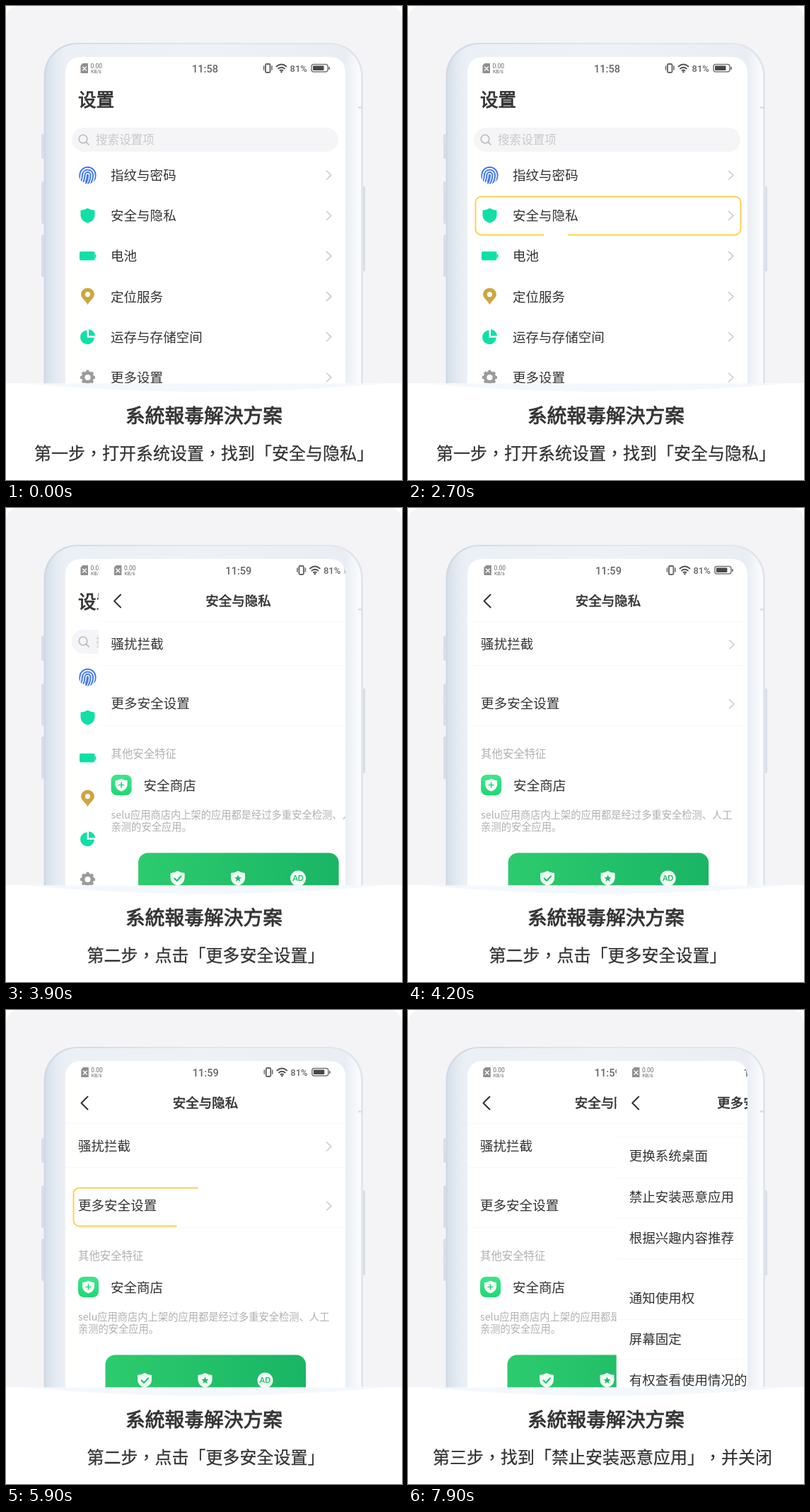
An HTML page that plays this animation: 560x670 px, repeating every 8 s.

```html
<!DOCTYPE html>
<html lang="zh-Hans">
<head>
<meta charset="utf-8">
<style>
html, body { margin: 0; width: 100%; height: 100%; overflow: hidden; background: #fff; }
svg { display: block; width: 560px; height: 670px; }
text { font-family: "Noto Sans CJK SC", "Noto Sans CJK", sans-serif; fill: #333; text-spacing-trim: space-all; white-space: pre; }
.num { font-family: Roboto, sans-serif; fill: #666; }
.cap { font-family: "Noto Sans CJK TC", "Noto Sans CJK", sans-serif; stroke: #333; stroke-width: 0.25; }
.medium { stroke: #333; stroke-width: 0.032em; }
.pale { fill: #b0b0b0; }
.line { fill: none; stroke-linecap: round; stroke-linejoin: round; }
</style>
</head>
<body>
<svg id="stage" viewBox="0 0 560 670"></svg>
<script>
const stage = document.getElementById('stage');

const text = (x, y, s, size = 18.55, attrs = '') =>
  `<text x="${x}" y="${y + size * 0.35}" font-size="${size}" ${attrs}>${s}</text>`;
const line = (d, color, width, attrs = '') =>
  `<path class="line" d="${d}" stroke="${color}" stroke-width="${width}" ${attrs}/>`;
const at = (x, y, body, scale = 1) => `<g transform="translate(${x} ${y}) scale(${scale})">${body}</g>`;
const arrow = y => line(`M453.5 ${y - 6} l6.5 6 -6.5 6`, '#c9c9c9', 1.5);
const divider = y => `<rect x="84" y="${y}" width="396" height="1" fill="#f8f8f9"/>`;
const shield = fill =>
  `<path d="M0 -10.5 Q5 -7.5 10 -7.5 V0 Q9.5 7.5 0 10.5 Q-9.5 7.5 -10 0 V-7.5 Q-5 -7.5 0 -10.5Z" fill="${fill}"/>`;

function status(time) {
  const grey = '#777';
  return '<path d="M108.5 81 H116 V95 H105.5 V84Z" fill="#8f8f8f"/>' +
    line('M108.5 86 l5 5 m0 -5 l-5 5', '#fff', 1.3) +
    `<text class="num" x="119.500" y="87.500" font-size="8.500">0.00</text>
    <text class="num" x="120" y="94.500" font-size="6.800">KB/s</text>
    <text class="num" x="281.500" y="93.500" font-size="14.600" font-weight="500" text-anchor="middle">${time}</text>
    <rect x="367" y="82" width="6.500" height="12" rx="1.500" fill="none" stroke="#666" stroke-width="1.900"/>` +
    line('M364.5 85 v5 M376 85 v5', grey, 1.7) +
    line('M382.5 85.5 Q389.5 79.5 396.5 85.5 M385 88.5 Q389.5 84.8 394 88.5 M387.5 91.3 Q389.5 89.8 391.5 91.3', '#555', 1.9) +
    `<circle cx="389.500" cy="93.300" r="1.200" fill="#555"/>
    <text class="num" x="401.500" y="92.700" font-size="13" font-weight="500">81%</text>
    <rect x="432" y="82.500" width="23" height="10.500" rx="3" fill="none" stroke="${grey}" stroke-width="1.500"/>
    <rect x="434" y="84.500" width="15.500" height="6.500" rx="1" fill="#484848"/>
    <rect x="456" y="86" width="2" height="4" rx="1" fill="${grey}"/>`;
}

const green = '#0fe0a6';
const icons = [
  `<g clip-path="url(#round)">${[11.2, 7.6, 4, 0.6].map(r =>
    line(`M${-r - 2} 9 Q${-r} 5 ${-r} 0 A${r} ${r} 0 0 1 ${r} 0 Q${r} 7 ${r - 4} 13`, '#4379f2', 2)).join('')}</g>`,
  shield(green),
  `<rect x="-11.500" y="-6.500" width="21.500" height="12.500" rx="2" fill="${green}"/>
   <rect x="10" y="-2.500" width="2" height="5" rx="1" fill="${green}"/>`,
  `<path d="M0 12 C-2 6 -9.500 3 -9.500 -3 A9.500 9 0 0 1 9.500 -3 C9.500 3 2 6 0 12Z" fill="#cfa53e"/>
   <circle cy="-3" r="3.600" fill="#fff"/>`,
  `<path d="M-1 -9.500 A10 10 0 1 0 9.500 1 H-1Z M1.500 -10.500 A9.500 9.500 0 0 1 10.500 -1.500 H1.500Z" fill="${green}"/>`,
  `<circle r="6.400" fill="none" stroke="#9b9b9b" stroke-width="4.600"/>
   <circle r="9" fill="none" stroke="#9b9b9b" stroke-width="3" pathLength="16" stroke-dasharray="1.100 0.900" stroke-dashoffset="0.550"/>`
];
const rows = ['指纹与密码', '安全与隐私', '电池', '定位服务', '运存与存储空间', '更多设置'];

const home = status('11:58') + text(102, 133, '设置', 25.6, 'class="medium"') +
  '<rect x="93" y="172" width="377" height="34" rx="17" fill="#f5f5f7"/>' +
  '<circle cx="109" cy="188" r="5.8" fill="none" stroke="#c0c0c0" stroke-width="1.8"/>' +
  line('M113.5 192.5 l3.5 3.5', '#c0c0c0', 1.8) +
  text(127, 189.5, '搜索设置项', 16.6, 'style="fill:#c9c9c9"') +
  rows.map((s, i) => {
    const y = 239 + i * 57.2;
    return at(115.5, y, icons[i]) + text(148, y + 0.5, s) + arrow(y);
  }).join('');

const header = title => '<rect x="84" y="72" width="396" height="470" fill="#fff"/>' + at(0.8, 0, status('11:59')) +
  line('M115.5 122.5 l-9 9 9 9', '#333', 2) +
  text(282, 131.8, title, 18.5, 'class="medium" text-anchor="middle"') + divider(160);

const privacy = header('安全与隐私') + [222, 307].map(divider).join('') +
  text(102, 193, '骚扰拦截') + arrow(193) + text(102, 277, '更多安全设置') + arrow(277) +
  text(102, 347.5, '其他安全特征', 15.4, 'class="pale"') +
  '<rect x="102" y="377" width="29" height="29" rx="8" fill="url(#app)"/>' +
  at(116.5, 391.5, shield('#fff') + line('M-4 0 h8 M0 -4 v8', '#27d877', 2), 0.85) +
  text(148, 392.5, '安全商店') +
  text(102, 434.3, 'selu应用商店内上架的应用都是经过多重安全检测、人工', 14.27, 'class="pale"') +
  text(102, 451.3, '亲测的安全应用。', 14.27, 'class="pale"') +
  '<rect x="140.5" y="487.5" width="283.5" height="90" rx="14" fill="url(#card)"/>' +
  at(196, 523.5, shield('#effff4') + line('M-4.5 0 l3.5 3.5 6 -6.5', '#21bf68', 2)) +
  at(281.5, 523.5, shield('#effff4') +
    '<path d="M0 -5 L1.5 -1.6 5 -1.4 2.2 .9 3.2 4.5 0 2.5 -3.2 4.5 -2.2 .9 -5 -1.4 -1.5 -1.6Z" fill="#1fbc67"/>') +
  '<circle cx="366.5" cy="523.5" r="11" fill="#effff4"/>' +
  '<text x="366.5" y="527.3" font-size="10.5" font-weight="700" text-anchor="middle" style="font-family:Lato,sans-serif;fill:#1fbc67">AD</text>';

const options = { 207: '更换系统桌面', 265: '禁止安装恶意应用', 323: '根据兴趣内容推荐',
  408: '通知使用权', 466: '屏幕固定', 524: '有权查看使用情况的应用' };
const more = header('更多安全设置') + [179, 237, 294, 352, 437, 494].map(divider).join('') +
  Object.entries(options).map(([y, s]) => text(102, +y, s) + arrow(+y)).join('');

const gradient = (id, stops, attrs = '') => `<linearGradient id="${id}" ${attrs}>` +
  stops.map(([o, c]) => `<stop offset="${o}" stop-color="${c}"/>`).join('') + '</linearGradient>';
const button = (x, y, h) => `<rect x="${x}" y="${y}" width="4.500" height="${h}" rx="2" fill="#d8dee7"/>`;

stage.innerHTML = `<defs>
  <clipPath id="screen"><path d="M84 535 V96 Q84 72 108 72 H456 Q480 72 480 96 V535Z"/></clipPath>
  <clipPath id="round"><circle r="12.500"/></clipPath>
  ${gradient('edge', [[0, '#d0d9e4'], [0.5, '#e1e7ef'], [1, '#e2e5ec']])}
  ${gradient('body', [[0, '#d6dfe9'], [0.03, '#e3eaf1'], [0.06, '#ebf0f6'], [0.5, '#eef2f7'], [0.95, '#eaeef4'], [0.985, '#f6f8fb'], [1, '#fbfcfd']])}
  ${gradient('app', [[0, '#3fe58a'], [1, '#1dd873']], 'x2="0" y2="1"')}
  ${gradient('card', [[0, '#2dcb6e'], [1, '#19b565']])}
</defs>
<path d="M0 533 V20 Q0 0 20 0 H540 Q560 0 560 20 V533Z" fill="#f4f4f6"/>
${button(50, 181, 35)}${button(50, 248, 60)}${button(50, 323, 60)}${button(503.5, 255, 120)}
<rect x="53.500" y="52" width="451.500" height="560" rx="47" fill="url(#edge)"/>
<rect x="56" y="54" width="446" height="560" rx="45" fill="url(#body)"/>
<path d="M498 143.500 H505" stroke="#dde1e8" stroke-width="3"/>
<g clip-path="url(#screen)">
  <rect x="84" y="72" width="396" height="470" fill="#fff"/>${home}
  <g id="privacy">${privacy}</g><g id="more">${more}</g>
</g>
<g id="tap">
  <circle id="outer" fill="#fffdf6" stroke="#f8d978" stroke-width="1.600"/>
  <circle id="inner" fill="#fffcf0" stroke="#fbeebf" stroke-width="1.300"/>
  <circle id="dot" fill="#fdf6d8"/>
</g>
${line('M283 305.5 H103.5 a8 8 0 0 1 -8 -8 V259.5 a8 8 0 0 1 8 -8 H462.5 a8 8 0 0 1 8 8 V297.5 a8 8 0 0 1 -8 8Z',
    '#fad252', 2, 'id="frame" pathLength="848" style="stroke-linecap:butt"')}
<rect y="533.500" width="560" height="137" fill="#fff"/>
<path d="M24 533.500 Q280 557 536 533.500Z" fill="#f4f7fb"/>
${text(280, 579, '系統報毒解決方案', 27.75, 'class="cap medium" lang="zh-Hant" text-anchor="middle"')}
${text(40, 633, '', 24, 'id="caption" class="cap" lang="zh-Hant"')}`;

const el = id => document.getElementById(id);
const set = (id, attrs) => { for (const k in attrs) el(id).setAttribute(k, attrs[k]); };
const show = (id, on) => set(id, { visibility: on ? 'visible' : 'hidden' });
const clamp = v => Math.min(1, Math.max(0, v));
const easeOut = u => 1 - (1 - clamp(u)) ** 2;

// tap start, outline start, page change, ripple centre, outline shift
const taps = [
  { start: 200, trace: 1035, end: 3200, x: 282, y: 297, shift: 18 },
  { start: 4500, trace: 5380, end: 7600, x: 281.5, y: 280, shift: 0 }
];
const captions = [
  [40, '第一步，打开系统设置，找到「安全与隐私」'],
  [114.5, '第二步，点击「更多安全设置」'],
  [35, '第三步，找到「禁止安装恶意应用」，并关闭']
];

function ripple(tap, age) {
  const r = age < 850 ? 35 * Math.sin(age / 850 * Math.PI / 2) : 35 - (age - 850) * 0.003;
  set('tap', { transform: `translate(${tap.x} ${tap.y})`, opacity: clamp((1350 - age) / 550) });
  set('outer', { r });
  set('inner', { r: r * 0.67 });
  set('dot', { r: 3 + age * 0.012 });
}

function trace(tap, t) {
  const e = easeOut((t - tap.trace) / 2080);
  const tail = 95 * e, length = 848 * e;
  set('frame', { transform: `translate(0 ${tap.shift})`,
    'stroke-dasharray': `${length} ${848 - length}`, 'stroke-dashoffset': -tail });
}

function slide(id, start, t) {
  show(id, t > start);
  set(id, { transform: `translate(${396 * (1 - easeOut((t - start - 20) / 1035))} 0)` });
}

function draw(now) {
  const t = Math.floor(now % 8000 / 100) * 100; // ten pictures a second
  const tap = taps.find(p => t >= p.start && t < p.end);
  show('tap', tap);
  show('frame', tap && t > tap.trace);
  if (tap) {
    ripple(tap, t - tap.start);
    trace(tap, t);
  }
  slide('privacy', 3200, t);
  slide('more', 7600, t);
  const [x, words] = captions[t < 3200 ? 0 : t < 7600 ? 1 : 2];
  set('caption', { x });
  el('caption').textContent = words;
}

const begin = performance.now();
function tick() {
  draw(performance.now() - begin);
  requestAnimationFrame(tick);
}
tick();
</script>
</body>
</html>
```
